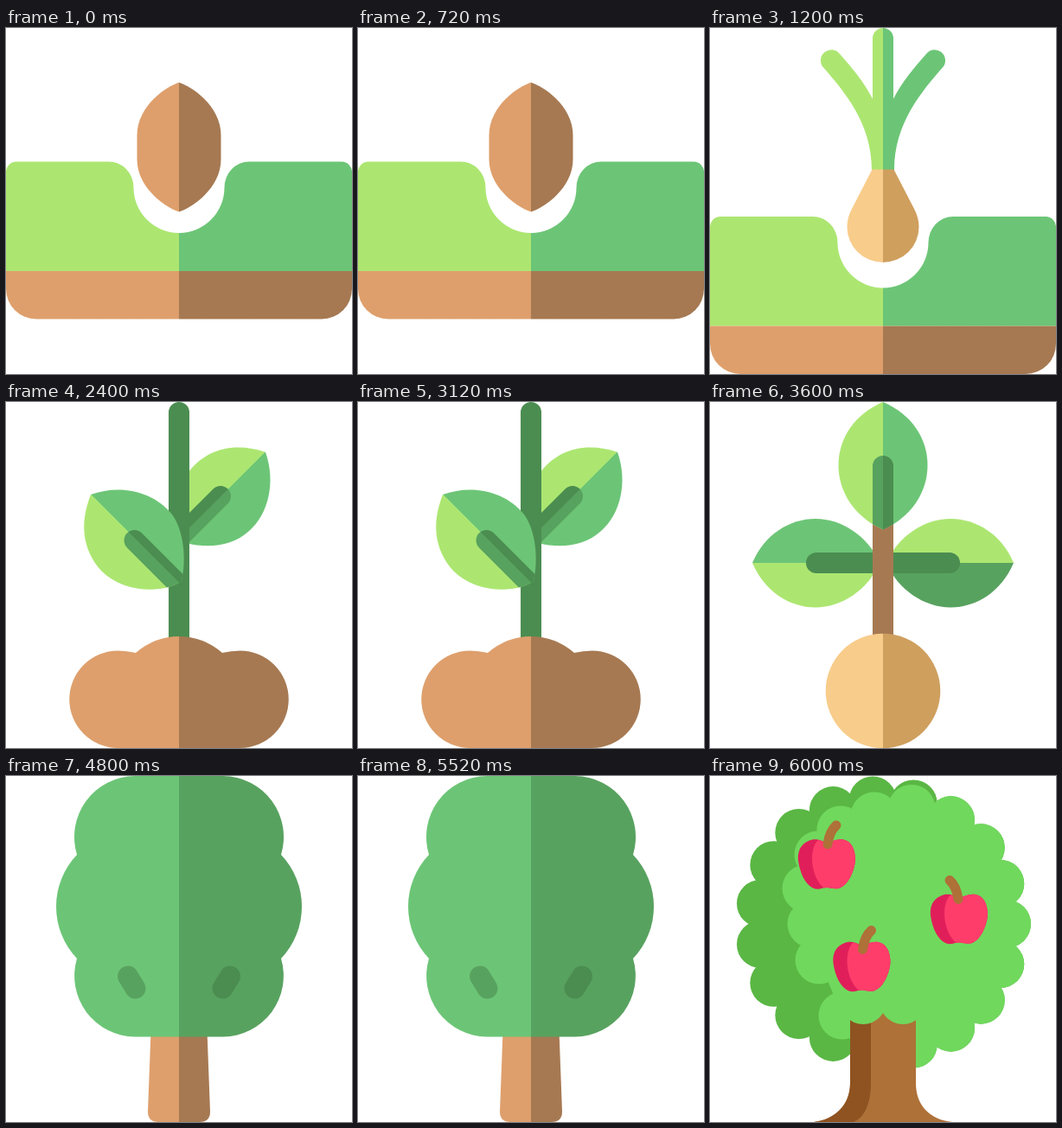
Recreate the animation shown at these times as an HTML page. Size 400 by 400 pixels, loop 7.2 s.

```html
<!DOCTYPE html>
<html lang="en">
<head>
<meta charset="utf-8">
<title>From seed to tree</title>
<style>
  html, body { margin: 0; width: 100%; height: 100%; overflow: hidden; background: #fff; }
  svg { display: block; width: 100%; height: 100%; }
  .stage { display: none; }
  .stage.on { display: inline; }
  .vein { fill: none; stroke-width: 24; stroke-linecap: round; }
</style>
</head>
<body>
<svg viewBox="0 0 400 400">
  <defs>
    <g id="ground">
      <path fill="url(#grass)" d="M0 167A12 12 0 0 1 12 154.5H119A28.5 30 0 0 1 147.5 184.5A52.5 52.5 0 0 0 252.5 184.5A28.5 30 0 0 1 281 154.5H388A12 12 0 0 1 400 167V281H0Z"/>
      <path fill="url(#soil)" d="M0 281H400V301.5A35 35 0 0 1 365 336.5H35A35 35 0 0 1 0 301.5Z"/>
    </g>
    <g id="apple">
      <path id="flesh" fill="#e01f5a" d="M135 78C128 73 120 72 114 75C104 79 101 88 102 98C104 112 110 126 120 130C126 132 130 129 135 129C140 129 145 132 151 129C160 125 167 110 168 97C168 84 163 75 154 73.5C147 72.5 141 75 135 78Z"/>
      <path fill="#ff3d6b" d="M125 74C114 84 116 117 132 129.5Q133 129 135 129C140 129 145 132 151 129C160 125 167 110 168 97C168 84 163 75 154 73.5C147 72.5 141 75 135 78Q130 75 125 74Z"/>
    </g>
    <path id="stalk" fill="none" stroke="#ae7138" stroke-width="11" stroke-linecap="round" d="M136 79Q138 64 146 57"/>
    <path id="lowLeaf" d="M98 107C130 95 170 102 192 130C205 148 209 180 203 207Q196 212 188 214C165 220 132 217 110 195C88 170 85 140 98 107Z"/>
    <path id="topLeaf" d="M200 0C167 14 148.5 42 148.5 73S167 133 200 147.5C233 133 251.5 104 251.5 73S233 14 200 0Z"/>
    <path id="sideLeaf" d="M49 186C63 153 92 135 122 135S183 155 196 186C183 217 152 237.5 122 237.5S63 219 49 186Z"/>
    <clipPath id="inLowLeaf"><use href="#lowLeaf"/></clipPath>
    <clipPath id="inTopLeaf"><use href="#topLeaf"/></clipPath>
  </defs>

  <g class="stage">
    <use href="#ground"/>
    <path fill="url(#soil)" d="M200 63C186 67 151.5 90 151.5 124V152C151.5 186 187 209 200 212.5C213 209 248.5 186 248.5 152V124C248.5 90 214 67 200 63Z"/>
  </g>

  <g class="stage">
    <use href="#ground" y="63.5"/>
    <path fill="url(#grass)" d="M130.5 45C155 73 187 110 187 164H213C213 110 245 73 269.5 45A12.3 12.3 0 0 0 250 30C236 46 222 62 212 82V12A12 12 0 0 0 188 12V82C178 62 164 46 150 30A12.3 12.3 0 0 0 130.5 45Z"/>
    <path fill="url(#bulb)" d="M187.5 163.5L164 209C160.5 216 158.5 222 158.5 230A41.5 41 0 0 0 241.5 230C241.5 222 239.5 216 236 209L212.5 163.5Z"/>
  </g>

  <g class="stage">
    <path fill="url(#highLeafFill)" d="M208 85C230 53 265 46 300 58C312 92 304 130 280 150C262 166 235 170 208 163Z"/>
    <path class="vein" stroke="url(#highVein)" d="M248 109L200 157"/>
    <path class="vein" stroke="#4b8d50" d="M200 12V290"/>
    <use href="#lowLeaf" fill="url(#lowLeafFill)"/>
    <path class="vein" stroke="url(#lowVein)" clip-path="url(#inLowLeaf)" d="M148.500 160L210 221.500"/>
    <path fill="url(#soil)" d="M129.500 400A56.250 56.250 0 0 1 129.500 287.500Q140 287.500 150 290Q172 271 200 271T250 290Q260 287.500 270.500 287.500A56.250 56.250 0 0 1 270.500 400Z"/>
  </g>

  <g class="stage">
    <use href="#sideLeaf" fill="url(#leftLeafFill)"/>
    <use href="#sideLeaf" fill="url(#rightLeafFill)" transform="translate(400 0) scale(-1 1)"/>
    <path class="vein" stroke="#4b8d50" d="M123 186H277"/>
    <path fill="#a67952" d="M188 135H212V272H188Z"/>
    <use href="#topLeaf" fill="url(#grass)"/>
    <path class="vein" stroke="url(#topVein)" clip-path="url(#inTopLeaf)" d="M200 74L200.010 160"/>
    <circle fill="url(#bulb)" cx="200" cy="334" r="66.300"/>
  </g>

  <g class="stage">
    <path fill="url(#soil)" d="M167.500 295L164 388Q164 400 176 400H224Q236 400 236 388L232.500 295Z"/>
    <path fill="url(#crown)" d="M149 0A70.500 70.500 0 0 0 82 91A87 87 0 0 0 82 211A70.500 70.500 0 0 0 149 301.500H251A70.500 70.500 0 0 0 318 211A87 87 0 0 0 318 91A70.500 70.500 0 0 0 251 0Z"/>
    <path class="vein" stroke="#58a25f" d="M141 231.500L149.500 245.500"/>
    <path class="vein" stroke="#4b8d50" d="M259 231.500L250.500 245.500"/>
  </g>

  <g class="stage">
    <g id="foliage"></g>
    <path fill="#ae7138" d="M162 255V355C162 380 145 397 120 400H280C253 397 238 380 238 355V255Z"/>
    <path fill="#8e5320" d="M162 255H186V355C186 380 178 395 166 400H120C145 397 162 380 162 355Z"/>
    <g fill="#70d85d">
      <circle cx="177" cy="260" r="27"/>
      <circle cx="223" cy="260" r="27"/>
    </g>
    <use href="#apple"/><use href="#stalk"/>
    <g transform="translate(40.500 118.500)"><use href="#apple"/><use href="#stalk" y="3"/></g>
    <g transform="translate(153 63.500)"><use href="#apple"/><use href="#stalk" transform="translate(270 0) scale(-1 1)"/></g>
  </g>
</svg>
<script>
const svg = document.querySelector('svg');
const defs = svg.querySelector('defs');

function draw(parent, tag, attrs) {
  const node = document.createElementNS(svg.namespaceURI, tag);
  for (const key in attrs) node.setAttribute(key, attrs[key]);
  return parent.appendChild(node);
}

// A paint with two flat colours meeting halfway between two points.
function split(id, first, second, [x1, y1, x2, y2] = [0, 0, 400, 0]) {
  const paint = draw(defs, 'linearGradient', { id, x1, y1, x2, y2, gradientUnits: 'userSpaceOnUse' });
  for (const color of [first, second]) draw(paint, 'stop', { offset: 0.5, 'stop-color': color });
}

const lime = '#ace671', green = '#6cc576', deep = '#58a25f', dark = '#4b8d50';
const rising = [100, 208, 200, 108], falling = [206, 52, 306, 152], down = [0, 0, 0, 372];
split('grass', lime, green);
split('soil', '#de9f6c', '#a67952');
split('bulb', '#f8cc8b', '#cf9f5e');
split('crown', green, deep);
split('topVein', deep, dark);
split('lowLeafFill', lime, green, rising);
split('lowVein', deep, dark, rising);
split('highLeafFill', lime, green, falling);
split('highVein', dark, deep, falling);
split('leftLeafFill', green, lime, down);
split('rightLeafFill', lime, deep, down);

// Scalloped foliage: a filled core with round bumps at its corners.
function scallop(fill, centers) {
  const group = draw(document.getElementById('foliage'), 'g', { fill });
  draw(group, 'polygon', { points: centers.join(' ') });
  for (const [cx, cy] of centers) draw(group, 'circle', { cx, cy, r: 27.5 });
}

const BUMPS = 19;
const ring = Array.from({ length: BUMPS }, (_, i) => {
  const angle = (i - 4) * 2 * Math.PI / BUMPS;
  return [200 + 143.5 * Math.cos(angle), 171 + 143.5 * Math.sin(angle)];
});
scallop('#5ab744', ring);
scallop('#70d85d', [
  [233, 37.5], ...ring.slice(1, 9),
  [153, 277], [126, 213], [117, 171], [111, 130], [125, 91], [151, 62], [190, 46]
]);

const STAGE_MS = 1200;
const stages = [...document.querySelectorAll('.stage')];
const start = performance.now();

function frame() {
  const current = Math.floor((performance.now() - start) / STAGE_MS) % stages.length;
  stages.forEach((stage, i) => stage.classList.toggle('on', i === current));
  requestAnimationFrame(frame);
}
frame();
</script>
</body>
</html>
```
